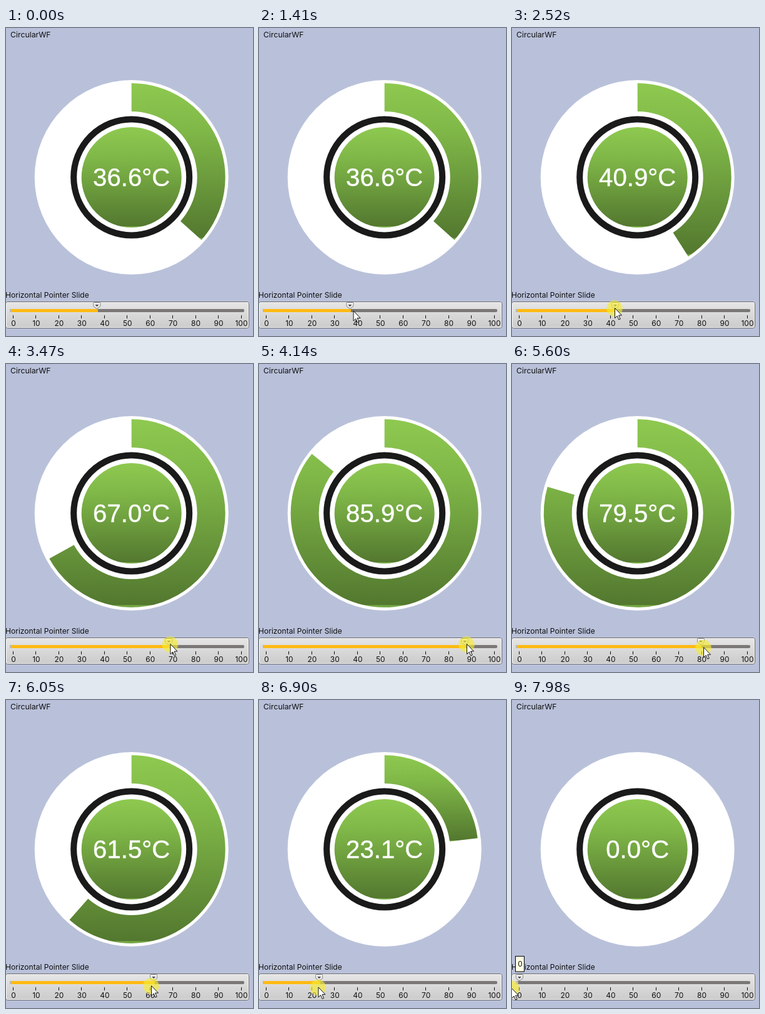
Write an HTML page that moves like this. It is 395 by 491 pixels and loops after 8000 ms.

```html
<!DOCTYPE html>
<html lang="en">
<head>
<meta charset="utf-8">
<title>Circular gauge</title>
<style>
  html, body { margin: 0; width: 100%; height: 100%; overflow: hidden; background: #b9c1da; }
  svg { display: block; width: 395px; height: 491px; }
  text { font: 12px Inter, "Open Sans", sans-serif; fill: #111; }
  #reading { font: 40.2px "Liberation Sans", Arial, sans-serif; fill: #fff; stroke: #fff; stroke-width: .4; }
  .mid { text-anchor: middle; }
</style>
</head>
<body>
<svg viewBox="0 0 395 491">
  <defs>
    <linearGradient id="green" x2="0" y2="1">
      <stop offset="0" stop-color="#8ec950"/>
      <stop offset=".3" stop-color="#80b848"/>
      <stop offset=".985" stop-color="#53782f"/>
      <stop offset=".99" stop-color="#76a845"/>
    </linearGradient>
    <linearGradient id="metal" x2="0" y2="1">
      <stop offset="0" stop-color="#e6e6e6"/>
      <stop offset="1" stop-color="#cbcbcb"/>
    </linearGradient>
    <linearGradient id="knobFill" x2="0" y2="1">
      <stop offset="0" stop-color="#fff"/>
      <stop offset="1" stop-color="#d4d4d4"/>
    </linearGradient>
    <radialGradient id="glow">
      <stop offset=".85" stop-color="#f6ec30" stop-opacity=".66"/>
      <stop offset="1" stop-color="#f6ec30" stop-opacity=".4"/>
    </radialGradient>
  </defs>

  <text x="7" y="15" style="font-size:12.3px">CircularWF</text>

  <g id="dial" transform="translate(200.7 238)">
    <circle r="155" fill="#fff"/>
    <path id="wedge" fill="url(#green)" fill-rule="evenodd"/>
    <circle r="92.5" fill="none" stroke="#1a1a1a" stroke-width="10"/>
    <circle r="80" fill="url(#green)"/>
    <text id="reading" class="mid" y="13.5"></text>
  </g>

  <text x="-1" y="430" style="font-size:12.1px">Horizontal Pointer Slide</text>
  <rect x="-.5" y="436.5" width="389" height="42" rx="3.5" fill="url(#metal)" stroke="#6c6c6c"/>
  <rect x=".5" y="437.5" width="387" height="40" rx="2.5" fill="none" stroke="#f5f5f5"/>
  <rect x="5.5" y="447" width="376.5" height="7" rx="3" fill="#dedede"/>
  <rect x="6" y="448" width="375" height="5" rx="2" fill="#7b7777"/>
  <rect x="6" y="448" width="4" height="5" rx="2" fill="#bbb9c4"/>
  <rect id="fill" x="8" y="448" height="5" fill="#ffba14"/>
  <g id="scale"></g>
  <g id="knob">
    <path d="M-5.5 438.5q0-1 1-1h9q1 0 1 1v5l-5.5 4.5l-5.5-4.5z" fill="url(#knobFill)" stroke="#858585"/>
    <path d="M-3 441h6l-3 3z" fill="#444"/>
  </g>

  <g id="tip">
    <rect id="tipBox" y="408.5" height="24.5" fill="#ffffe1" stroke="#000"/>
    <text id="tipText" class="mid" y="425"></text>
  </g>
  <g id="cursor">
    <circle id="halo" cy="1" r="13" fill="url(#glow)"/>
    <path d="M.5 .5V16.5L4.2 13L6.8 19L9.2 18L6.6 12H11.5Z" fill="#fff" stroke="#111"/>
  </g>
</svg>
<script>
const LOOP = 8000, OUTER = 150, INNER = 105;
const PRESS = 2220, FALL = 5090, LEAD = 40;

// Key points: time in ms, then the values to interpolate
const gauge = [[PRESS, 36.6], [2520, 40.9], [3470, 67], [4640, 100],
               [FALL, 100], [6050, 61.5], [6900, 23.1], [7490, 0]];
const mouse = [[650, 154, 492], [1150, 150, 455], [1330, 150, 455], [1470, 151, 447],
               [1830, 151, 447], [1910, 147, 443], [PRESS, 147, 443], [2520, 164, 446],
               [4700, 390, 446], [FALL, 390, 447], [6050, 232, 455], [7490, -1, 459]];

const $ = id => document.getElementById(id);
const put = (el, attrs) => { for (const k in attrs) el.setAttribute(k, attrs[k]); };
const show = (el, on) => put(el, { visibility: on ? "visible" : "hidden" });
const slideX = v => 12 + v * 3.645;

function at(keys, t) {
  const i = keys.findIndex(k => k[0] > t);
  if (i === 0) return keys[0].slice(1);
  if (i < 0) return keys[keys.length - 1].slice(1);
  const a = keys[i - 1], b = keys[i], p = (t - a[0]) / (b[0] - a[0]);
  return a.slice(1).map((v, k) => v + (b[k + 1] - v) * p);
}

const ring = r => `M0 ${-r}a${r} ${r} 0 1 1 0 ${2 * r}a${r} ${r} 0 1 1 0 ${-2 * r}z`;

function wedgePath(v) {
  if (v > 99.95) return ring(OUTER) + ring(INNER);
  if (v < 0.05) return "";
  const a = v / 50 * Math.PI, big = v > 50 ? 1 : 0;
  const end = r => `${r * Math.sin(a)} ${-r * Math.cos(a)}`;
  return `M0 ${-OUTER}A${OUTER} ${OUTER} 0 ${big} 1 ${end(OUTER)}` +
         `L${end(INNER)}A${INNER} ${INNER} 0 ${big} 0 0 ${-INNER}z`;
}

let marks = "";
for (let v = 0; v <= 100; v += 10) {
  const x = slideX(v);
  marks += `<rect x="${Math.round(x) - 1}" y="458" width="1" height="5" fill="#111"/>` +
           `<text class="mid" x="${x}" y="475">${v}</text>`;
}
$("scale").innerHTML = marks;

function draw(t) {
  const [v] = at(gauge, t), [mx, my] = at(mouse, t);
  // While rising, the knob runs a little ahead of the dial
  const x = slideX(Math.max(v, at(gauge, t + LEAD)[0]));
  put($("wedge"), { d: wedgePath(v) });
  $("reading").textContent = v.toFixed(1) + "°C";
  put($("fill"), { width: v < 0.1 ? 0 : Math.max(0, x - 6.5) });
  put($("knob"), { transform: `translate(${x})` });

  const high = t >= 5070 && t < 5130, low = t >= 7740;
  show($("tip"), high || low);
  put($("tipBox"), { x: high ? 362.5 : 5.5, width: high ? 28 : 14 });
  put($("tipText"), { x: high ? 378 : 13 });
  $("tipText").textContent = high ? "100" : "0";

  put($("cursor"), { transform: `translate(${mx} ${my})` });
  show($("cursor"), t >= 650);
  show($("halo"), t >= PRESS);
}

const start = performance.now();
function tick() {
  const t = (performance.now() - start) % LOOP;
  draw(t - t % 10);
  requestAnimationFrame(tick);
}
tick();
</script>
</body>
</html>
```
